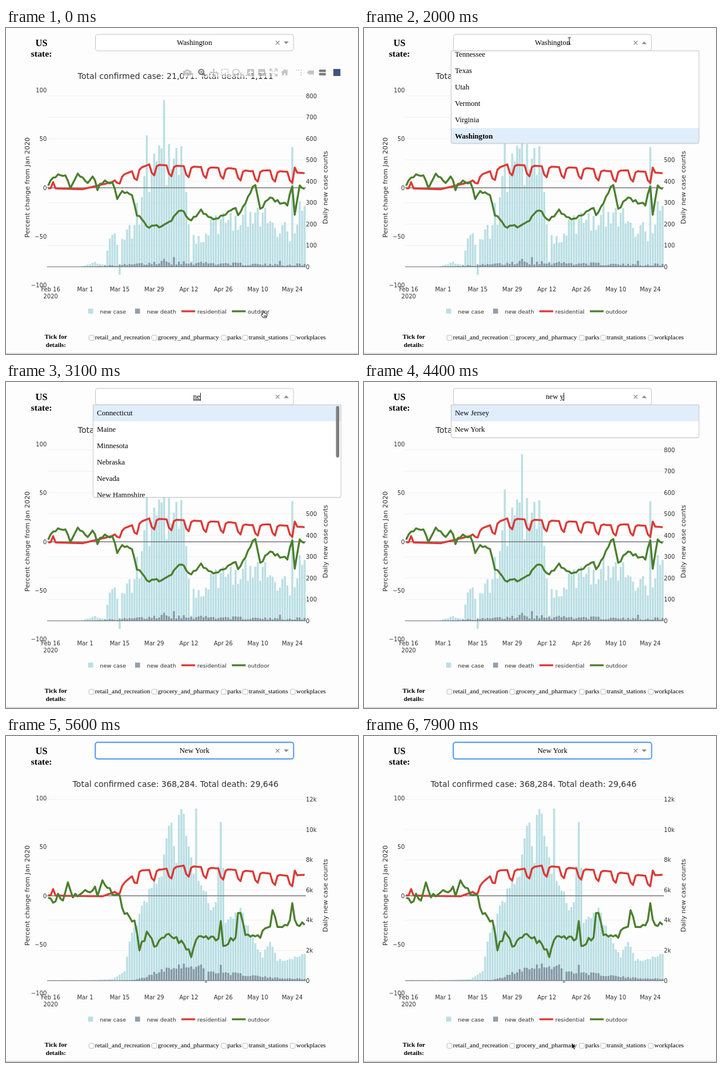
These frames come from a looping animation (600x557 px, 8000 ms). An HTML page:

```html
<!DOCTYPE html>
<html lang="en">
<head>
<meta charset="utf-8">
<title>State dashboard</title>
<style>
  html, body { margin: 0; width: 100%; height: 100%; overflow: hidden; background: #fdfdfd; }
  svg { display: block; width: 600px; height: 557px; }
  text { white-space: pre; }
  .sans { font-family: "DejaVu Sans", sans-serif; fill: #2e2e2e; }
  .serif { font-family: "Liberation Serif", serif; fill: #000; }
</style>
</head>
<body>
<svg id="stage" viewBox="0 0 600 557"></svg>
<script>
const LOOP = 8000, DAYS = 105, STEP = 4.203, X0 = 71.9;
const stage = document.getElementById('stage');

function add(parent, tag, attrs = {}, content) {
  const node = document.createElementNS('http://www.w3.org/2000/svg', tag);
  for (const key in attrs) node.setAttribute(key, attrs[key]);
  if (content !== undefined) node.textContent = content;
  parent.appendChild(node);
  return node;
}
const group = (parent, attrs) => add(parent, 'g', attrs);
const path = (parent, d, attrs) => add(parent, 'path', { d, ...attrs });
const rect = (parent, x, y, width, height, fill, attrs) =>
  add(parent, 'rect', { x, y, width, height, fill, ...attrs });
const label = (parent, cls, x, y, size, str, attrs) =>
  add(parent, 'text', { class: cls, x, y, 'font-size': size, ...attrs }, str);
const MID = { 'text-anchor': 'middle' };
const show = (node, on) => node.setAttribute('display', on ? 'inline' : 'none');

function lerp(points, x) {
  if (x <= points[0][0]) return points[0][1];
  for (let i = 1; i < points.length; i++) {
    const [a, va] = points[i - 1], [b, vb] = points[i];
    if (x <= b) return va + (vb - va) * (x - a) / (b - a);
  }
  return points[points.length - 1][1];
}
function random(seed) {
  return () => (seed = (seed * 16807) % 2147483647) / 2147483647;
}
const days = rule => Array.from({ length: DAYS }, (_, i) => rule(i));

// Bars: a trend with proportional noise and a few outlying days.
function counts({ trend, noise, outliers = {} }, seed) {
  const next = random(seed);
  return days(i => {
    const wobble = 1 + noise * (2 * next() - 1);
    return outliers[i] ?? lerp(trend, i) * wobble;
  });
}
// Time at home drops at weekends once the lockdown begins, and rises on public holidays.
function atHome(trend) {
  const weekend = [-8.5, -11, -1.5], holidays = [2, 100];
  return days(i => {
    const lockdown = Math.min(1, Math.max(0, (i - 22) / 12));
    const holiday = holidays.includes(i) ? 6.5 : 0;
    return lerp(trend, i) + lockdown * (weekend[i % 7] || 0) + holiday;
  });
}
// Time outdoors follows its turning points with a small daily wobble.
function outside(trend, wobble, seed) {
  const next = random(seed);
  return days(i => lerp(trend, i) + wobble * (2 * next() - 1));
}

// Key points are [day, value], where day 0 is Feb 15.
const washington = {
  title: 'Total confirmed case: 21,071. Total death: 1,111',
  zero: 408, unit: 0.365, tick: 100, ticks: 8, tickText: v => v,
  cases: counts({
    trend: [[13, 0], [19, 20], [23, 12], [25, 125], [34, 160], [36, 240], [42, 430], [54, 500],
      [57, 170], [61, 130], [70, 220], [84, 240], [98, 160], [104, 320]],
    noise: 0.28, outliers: { 29: -38, 40: 615, 47: 780, 58: 25, 99: 560 }
  }, 41),
  deaths: counts({
    trend: [[13, 0], [24, 5], [40, 14], [46, 22], [62, 18], [95, 8], [104, 12]],
    noise: 0.5, outliers: { 47: 37, 51: 45, 94: 28 }
  }, 17),
  residential: atHome([[0, -0.5], [14, -1.5], [26, 6], [31, 14], [41, 24], [60, 21.5], [74, 20],
    [82, 17], [89, 18], [104, 15]]),
  outdoor: outside([[0, 4], [4, 14], [7, 12], [9, 1], [12, 16], [16, 5], [18, 13], [20, -1],
    [22, 6], [26, 5], [28, -10], [30, -3], [34, -7], [36, -28], [41, -41], [48, -38], [54, -23],
    [58, -33], [62, -24], [67, -33], [76, -20], [77, -28], [84, 4], [86, -21], [90, -11],
    [97, -18], [99, 3], [100, -28], [102, 3], [104, -1]], 1.8, 29)
};
const newYork = {
  title: 'Total confirmed case: 368,284. Total death: 29,646',
  zero: 418, unit: 0.0258, tick: 2000, ticks: 6, tickText: v => v ? v / 1000 + 'k' : 0,
  cases: counts({
    trend: [[14, 10], [26, 100], [31, 600], [33, 2700], [40, 5400], [46, 7300], [49, 10800],
      [52, 8200], [53, 11200], [55, 10500], [59, 7300], [66, 4800], [68, 5000], [70, 10500],
      [71, 7000], [72, 3900], [78, 4600], [87, 1500], [90, 2700], [93, 1300], [104, 1700]],
    noise: 0.08, outliers: { 60: 11400 }
  }, 5),
  deaths: counts({
    trend: [[30, 5], [35, 50], [39, 200], [43, 500], [51, 1000], [62, 950], [65, 620],
      [80, 380], [90, 200], [104, 110]],
    noise: 0.22, outliers: { 64: -150, 70: 1050 }
  }, 17),
  residential: atHome([[0, 0.5], [7, 0], [22, -0.5], [27, 4], [32, 16], [37, 26], [46, 27],
    [55, 31], [69, 28], [83, 25], [97, 20.5], [104, 21.5]]),
  outdoor: outside([[0, 1], [2, -6], [4, 0], [6, -5], [8, 14], [10, 0], [14, 3], [19, 8], [20, -1],
    [22, 16], [25, 6], [29, -1], [31, -18], [35, -26], [37, -55], [40, -38], [43, -51], [49, -41],
    [52, -43], [58, -60], [61, -42], [69, -46], [70, -26], [71, -50], [76, -42], [77, -18],
    [78, -17], [80, -38], [85, -43], [90, -32], [91, -14], [93, -33], [98, -28], [99, -8],
    [100, -27], [104, -31]], 3, 11)
};

const CASE = '#b3dce2', DEATH = '#708090', RED = '#dc3a37', GREEN = '#4c7f2e';
const CASE_OPACITY = 0.9, DEATH_OPACITY = 0.75, LINE = 3.3;
const dayX = i => X0 + STEP * i;
const leftY = v => 273 - 1.664 * v;

function bars(parent, data, values, fill, opacity) {
  const bar = (v, i) => `M${dayX(i) - 1.68} ${data.zero}h3.36v${-v * data.unit}h-3.36z`;
  path(parent, values.map(bar).join(''), { fill, opacity });
}
function curve(parent, values, stroke) {
  const points = values.map((v, i) => `${dayX(i)},${leftY(v)}`).join(' ');
  add(parent, 'polyline', { points, fill: 'none', stroke, 'stroke-width': LINE, 'stroke-linejoin': 'round' });
}
function buildChart(data) {
  const g = group(stage);
  for (let k = 0; k <= data.ticks; k++) {
    const v = k * data.tick, y = data.zero - v * data.unit;
    path(g, `M70 ${y}H511`, { stroke: '#f0f0f1' });
    label(g, 'sans', 511.3, y + 3.6, 9.8, data.tickText(v));
  }
  bars(g, data, data.cases, CASE, CASE_OPACITY);
  bars(g, data, data.deaths, DEATH, DEATH_OPACITY);
  path(g, `M70 ${data.zero}H511`, { stroke: '#666c74', 'stroke-width': 1.1 });
  path(g, 'M70 273H511', { stroke: '#77797b', 'stroke-width': 1.4 });
  curve(g, data.residential, RED);
  curve(g, data.outdoor, GREEN);
  label(g, 'sans', 289, 87, 13.8, data.title, MID);
  return g;
}

function buildFrame() {
  const g = group(stage), bold = { ...MID, 'font-weight': 'bold' };
  label(g, 'serif', 60.5, 31, 16, 'US', bold);
  label(g, 'serif', 60.5, 49, 15.4, 'state:', bold);
  label(g, 'serif', 85, 531, 11.1, 'Tick for', bold);
  label(g, 'serif', 85, 544.5, 11.1, 'details:', bold);
  for (let v = 100; v >= -100; v -= 50)
    label(g, 'sans', 69.5, leftY(v) + 3.6, 9.8, String(v).replace('-', '−'), { 'text-anchor': 'end' });
  ['Feb 16', 'Mar 1', 'Mar 15', 'Mar 29', 'Apr 12', 'Apr 26', 'May 10', 'May 24'].forEach((s, k) =>
    label(g, 'sans', dayX(1 + 14 * k), 450, 9.7, s, MID));
  label(g, 'sans', 76.2, 462, 9.7, '2020', MID);
  label(g, 'sans', 0, 0, 11.35, 'Percent change from Jan 2020', { ...MID, transform: 'translate(40 272.5) rotate(-90)' });
  label(g, 'sans', 0, 0, 11.2, 'Daily new case counts', { ...MID, transform: 'translate(548 272.5) rotate(-90)' });
  rect(g, 140, 479.5, 8.5, 8.5, CASE, { opacity: CASE_OPACITY });
  rect(g, 220, 479.5, 8.5, 8.5, DEATH, { opacity: DEATH_OPACITY });
  path(g, 'M299 484H322.5', { stroke: RED, 'stroke-width': LINE });
  path(g, 'M385 484H408.5', { stroke: GREEN, 'stroke-width': LINE });
  [['new case', 160], ['new death', 240], ['residential', 326], ['outdoor', 412]].forEach(([s, x]) =>
    label(g, 'sans', x, 487.5, 9.5, s));
  [['retail_and_recreation', 141], ['grocery_and_pharmacy', 248], ['parks', 366.5],
    ['transit_stations', 403], ['workplaces', 484]].forEach(([s, x]) => {
    rect(g, x + 0.5, 525, 8.5, 8.5, '#fff', { rx: 2, stroke: '#aaa', 'stroke-width': 0.8 });
    label(g, 'serif', x + 10.8, 532, 11.05, s);
  });
  path(g, 'M0 556H600', { stroke: '#b9b9b9', 'stroke-width': 1.2 });
}

function buildModebar() {
  const g = group(stage);
  rect(g, 301, 66, 271, 18, '#fdfdfd', { opacity: 0.6 });
  const line = { fill: 'none', stroke: '#444', 'stroke-width': 1.6 };
  const icon = (x, d, attrs = {}, opacity = 0.3) =>
    path(g, d, { transform: `translate(${x} 76)`, fill: '#444', opacity, ...attrs });
  const hole = { 'fill-rule': 'evenodd' };
  const tile = 'M-5 -6H5L6 -5V5L5 6H-5L-6 5V-5Z';
  icon(309, 'M-7 -3H-4L-3 -5H3L4 -3H7V5H-7ZM3 1A3 3 0 1 0 -3 1A3 3 0 1 0 3 1ZM1.4 1A1.4 1.4 0 1 1 -1.4 1A1.4 1.4 0 1 1 1.4 1Z', hole);
  icon(334, 'M3 -1A4.2 4.2 0 1 0 -5.4 -1A4.2 4.2 0 1 0 3 -1ZM2 2L6 6M-3 -1H0.8', { ...line, 'stroke-width': 2.2 }, 0.7);
  icon(354, 'M0 -7L2.5 -4H1V-1H4V-2.5L7 0L4 2.5V1H1V4H2.5L0 7L-2.5 4H-1V1H-4V2.5L-7 0L-4 -2.5V-1H-1V-4H-2.5Z');
  icon(373, 'M-5.5 -5.5H5.5V5.5H-5.5Z', { ...line, 'stroke-dasharray': '2.2 1.5' });
  icon(392, 'M-2 3C-7 2 -7 -5 0 -5.3C7 -5 7 2 1 3.2C-2 3.5 -4 3 -3 6', line);
  const zoom = icon(417, tile + 'M-1 -4V-1H-4V1H-1V4H1V1H4V-1H1V-4Z', hole);
  icon(436, tile + 'M-4 -1V1H4V-1Z', hole);
  icon(456, 'M-6 -2V-6H-2M2 -6H6V-2M6 2V6H2M-2 6H-6V2M-5 -5L-1.5 -1.5M5 -5L1.5 -1.5M5 5L1.5 1.5M-5 5L-1.5 1.5', line);
  icon(475, 'M-6.5 0L0 -6L3 -3.2V-5H4.7V-1.7L6.5 0H4.7V5H1.3V1.5H-1.3V5H-4.7V0Z');
  icon(499, 'M-5 -4H4V6', { ...line, 'stroke-dasharray': '2 2' });
  icon(519, 'M-6 0L-3 -3.5H6V3.5H-3Z');
  icon(539, 'M-6 -2.5L-4.5 -5H6V-0.8H-4.5ZM-6 3L-4.5 0.8H6V5H-4.5Z', {}, 0.7);
  rect(g, 558, 70, 12, 12, '#3f5580');
  const tip = group(stage);
  path(tip, 'M413 89L417 84.5L421 89Z', { fill: '#566877' });
  rect(tip, 377, 88.5, 55, 22, '#566877', { rx: 2 });
  label(tip, 'sans', 404.5, 103, 9.6, 'Zoom in', { ...MID, style: 'fill:#fff' });
  return { g, zoom, tip };
}

function buildCursors() {
  const ink = { stroke: '#111', 'stroke-width': 1, 'stroke-linejoin': 'round' };
  const make = (d, attrs) => path(stage, d, attrs);
  return {
    hand: make('M-2.6 1.5V-4.6Q-1.6 -6.4 -0.6 -4.6V-1Q0.8 -2 1.6 -0.7Q2.9 -1.4 3.5 0Q5 -0.4 5 1.2V3.5L3.8 7H-1.6L-5 2.6Q-5 0.6 -2.6 1.5ZM-0.2 3.2V5.4M1.4 3.2V5.4M3 3.2V5.4', { ...ink, fill: '#fff' }),
    cross: make('M-6 0H6M0 -6V6', { ...ink, fill: 'none' }),
    beam: make('M-2.5 -6Q0 -6 0 -4.5V4.5Q0 6 -2.5 6M2.5 -6Q0 -6 0 -4.5M0 4.5Q0 6 2.5 6', { ...ink, fill: 'none' }),
    arrow: make('M-3 -6V4.5L-0.6 2.4L1 6L2.8 5.2L1.3 1.8H4.5Z', { fill: '#111', stroke: '#fff', 'stroke-width': 0.8 })
  };
}

// typed: [committed, composing]
const ROW = 28, MENU = 158;
const news = ['New Hampshire', 'New Jersey', 'New Mexico', 'New York'];
const steps = [
  { at: 0, value: 'Washington' },
  { at: 1900, value: 'Washington', shift: -8, pick: 5,
    items: ['Tennessee', 'Texas', 'Utah', 'Vermont', 'Virginia', 'Washington'] },
  { at: 2750, typed: ['', 'n'], thumb: 34,
    items: ['Arizona', 'California', 'Connecticut', 'Illinois', 'Indiana', 'Kansas'] },
  { at: 2950, typed: ['', 'ne'], thumb: 88,
    items: ['Connecticut', 'Maine', 'Minnesota', 'Nebraska', 'Nevada', 'New Hampshire'] },
  { at: 3500, typed: ['', 'new'], items: news },
  { at: 3900, typed: ['new ', ''], items: news },
  { at: 4200, typed: ['new ', 'y'], items: ['New Jersey', 'New York'] },
  { at: 4700, typed: ['new ', 'yo'], items: ['New York'] },
  { at: 5000, value: 'New York', focus: true }
];
const SWITCH = 5250;

function drawBox({ value, typed, items, focus }) {
  if (focus) rect(select, 151.5, 10.5, 339, 29, 'none', { rx: 5, stroke: '#8fbdf5', 'stroke-width': 2.4, opacity: 0.6 });
  rect(select, 152.5, 11, 337.5, 28, '#fff', { rx: 3.5, stroke: focus ? '#3c8cf0' : '#c4c4c4', 'stroke-width': focus ? 1.4 : 1 });
  path(select, 'M459.8 22L466.2 28.4M466.2 22L459.8 28.4', { stroke: '#8d8d8d', 'stroke-width': 1.2 });
  path(select, items ? 'M473.5 27.5H482L477.7 23Z' : 'M473.5 23H482L477.7 27.5Z', { fill: '#8d8d8d' });
  if (value) {
    label(select, 'serif', 321.3, 29, 12.6, value, MID);
    return;
  }
  const text = label(select, 'serif', 325, 29, 12.6, '', MID);
  add(text, 'tspan', {}, typed[0]);
  add(text, 'tspan', { 'text-decoration': 'underline' }, typed[1]);
  path(select, `M${325.5 + text.getComputedTextLength() / 2} 18.5V32`, { stroke: '#111' });
}
function drawMenu({ items, pick, shift = 0, thumb }) {
  const height = Math.min(MENU, ROW * items.length), bottom = 39 + height;
  clip.setAttribute('height', height);
  rect(select, 148.5, 40.5, 422.5, height, '#000', { rx: 3, opacity: 0.06 });
  rect(select, 148.5, 39, 422.5, height, '#fff');
  const rows = group(select, { 'clip-path': 'url(#menu)' });
  items.forEach((name, k) => {
    const y = 39 + shift + ROW * k;
    if (k === (pick ?? 0)) rect(rows, 148.5, y, 422.5, ROW, '#e0eefc');
    label(rows, 'serif', 155, y + 18, 12.6, name, { 'font-weight': k === pick ? 'bold' : 'normal' });
  });
  path(select, `M148.5 39V${bottom - 3}Q148.5 ${bottom} 151.5 ${bottom}H568Q571 ${bottom} 571 ${bottom - 3}V39Z`, { fill: 'none', stroke: '#c4c4c4' });
  if (thumb) rect(select, 562.5, 41, 5.5, thumb, '#7e7e7e', { rx: 2.7 });
}
function drawSelect(step) {
  select.replaceChildren();
  drawBox(step);
  if (step.items) drawMenu(step);
}

const clip = rect(add(add(stage, 'defs'), 'clipPath', { id: 'menu' }), 148, 39, 424, 0, '#fff');
const charts = [washington, newYork].map(buildChart);
buildFrame();
const modebar = buildModebar();
const select = group(stage);
const cursors = buildCursors();

const HIDE = 2750, RETURN = 6951;
const pathX = [[250, 440], [950, 410], [1350, 410], [1800, 350], [HIDE, 350], [RETURN, 612], [7850, 357]];
const pathY = [[250, 488], [950, 91], [1350, 91], [1800, 22], [HIDE, 22], [RETURN, 370], [7850, 530]];

function cursorKind(x, y) {
  if (y < 45) return 'beam';
  if (y > 512 || x > 572) return 'arrow';
  if ((y > 477 && y < 496) || (y > 66 && y < 96 && x > 300)) return 'hand';
  return 'cross';
}

let current;
function render(t) {
  const step = steps.findLast(s => s.at <= t);
  if (step !== current) drawSelect(current = step);
  show(charts[0], t < SWITCH);
  show(charts[1], t >= SWITCH);

  const x = lerp(pathX, t), y = lerp(pathY, t);
  const visible = t < HIDE || t > RETURN;
  const kind = visible && cursorKind(x, y);
  for (const name in cursors) {
    show(cursors[name], name === kind);
    cursors[name].setAttribute('transform', `translate(${x} ${y})`);
  }
  const hover = visible && x < 573 && y > 57 && y < 512;
  const zooming = hover && Math.abs(x - 414) < 10 && y < 97;
  show(modebar.g, hover);
  show(modebar.tip, zooming);
  modebar.zoom.setAttribute('opacity', zooming ? 0.75 : 0.3);
}

const start = performance.now();
function tick() {
  render((performance.now() - start) % LOOP);
  requestAnimationFrame(tick);
}
tick();
</script>
</body>
</html>
```
